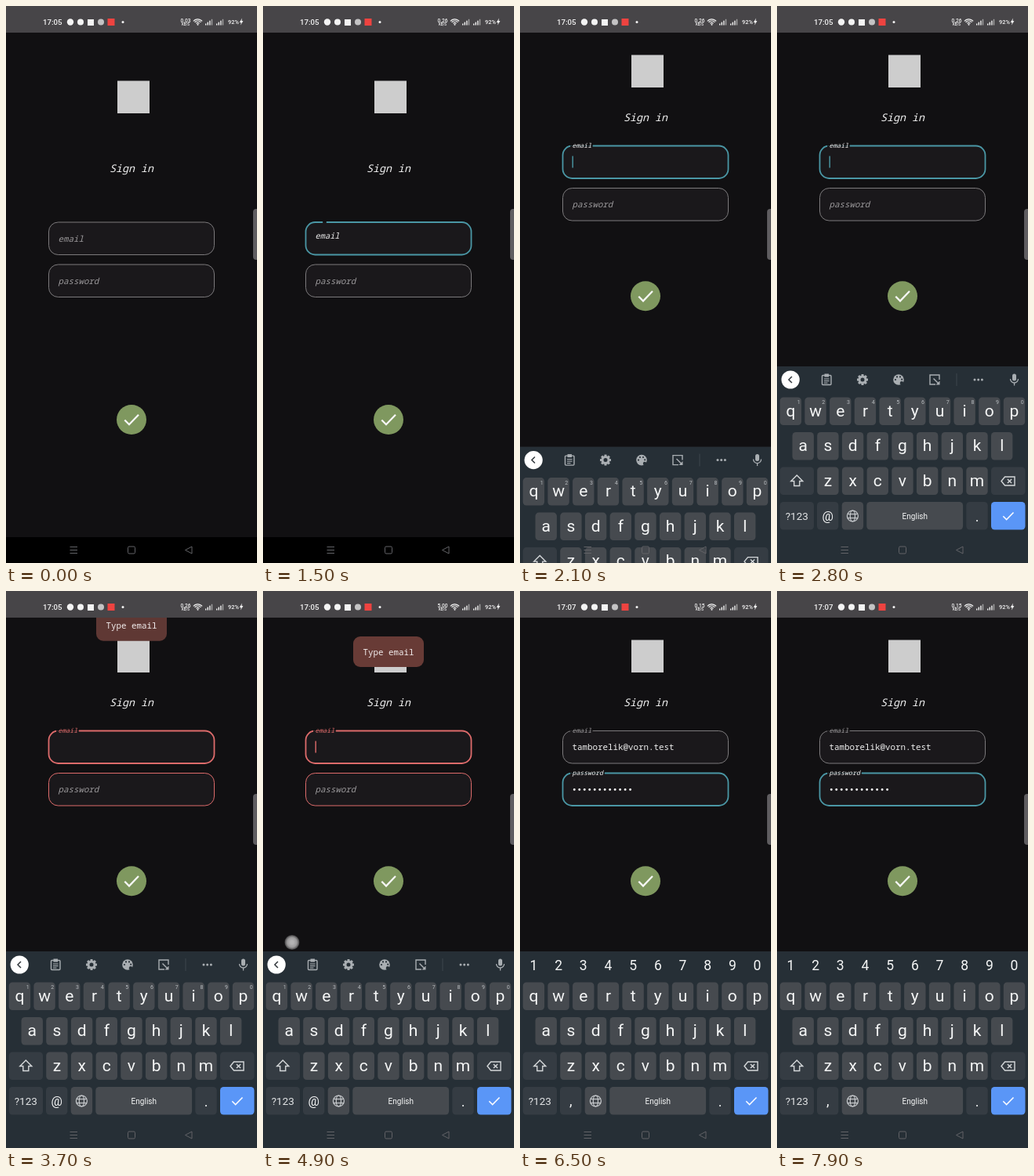
These frames come from a looping animation (320 by 711 pixels, 8 s). An HTML page with a canvas:

```html
<!DOCTYPE html>
<html lang="en">
<head>
<meta charset="utf-8">
<title>Sign in</title>
<style>
html, body { margin: 0; width: 100%; height: 100%; overflow: hidden; background: #111012; }
canvas { display: block; width: 320px; height: 711px; }
</style>
</head>
<body>
<canvas id="stage"></canvas>
<script>
const W = 320, H = 711, LOOP = 8000, CUT = 6500;
const BG = '#111012', FIELD = '#1a181b', KB = '#262f36', KEY = '#464a4f', DARK = '#353c43';
const TEAL = '#4a97a5', RED = '#dd6b6b', GREY = '#7c7a7c', ICON = '#a9aeb2';
const MONO = '"Noto Sans Mono", monospace', SANS = 'Roboto, sans-serif';

const cv = document.getElementById('stage');
const g = cv.getContext('2d');
const dpr = window.devicePixelRatio || 1;
cv.width = W * dpr;
cv.height = H * dpr;

const clamp = v => Math.max(0, Math.min(1, v));
const span = (t, a, b) => clamp((t - a) / (b - a));
const mix = (a, b, p) => a + (b - a) * p;
const easeOut = p => 1 - (1 - p) * (1 - p);
const easeInOut = p => p * p * (3 - 2 * p);

function text(s, x, y, font, color, align = 'left') {
  g.font = font;
  g.fillStyle = color;
  g.textAlign = align;
  g.fillText(s, x, y);
}
function rect(x, y, w, h, color) {
  g.fillStyle = color;
  g.fillRect(x, y, w, h);
}
function box(x, y, w, h, r, fill, stroke, lw = 1) {
  g.beginPath();
  g.roundRect(x, y, w, h, r);
  paint(fill, stroke, lw);
}
function disc(x, y, r, fill, stroke, lw = 1) {
  g.beginPath();
  g.arc(x, y, r, 0, Math.PI * 2);
  paint(fill, stroke, lw);
}
function paint(fill, stroke, lw) {
  if (fill) { g.fillStyle = fill; g.fill(); }
  if (stroke) { g.strokeStyle = stroke; g.lineWidth = lw; g.stroke(); }
}
// Polyline through x,y pairs, relative to an origin
function line(ox, oy, pts, stroke, lw, fill) {
  g.beginPath();
  for (let i = 0; i < pts.length; i += 2) g.lineTo(ox + pts[i], oy + pts[i + 1]);
  if (fill) g.closePath();
  paint(fill, stroke, lw);
}

function statusBar(t) {
  rect(0, 0, W, 34, '#474548');
  text(t < CUT ? '17:05' : '17:07', 47, 23.8, '500 9.7px ' + SANS, '#f4f4f4');
  disc(82, 20.5, 4.2, '#f4f4f4');
  disc(95, 20.5, 4, '#f4f4f4');
  rect(104, 17, 8, 8, '#f4f4f4');
  disc(121, 20.5, 4, '#c4c3c4');
  rect(129.5, 16, 9, 9, '#ee4340');
  disc(149, 20.5, 1.5, '#f4f4f4');
  const rate = t < 700 ? '0.03' : t < 4300 ? '0.26' : t < CUT ? '5.00' : '0.15';
  text(rate, 229, 20.5, '500 6.6px ' + SANS, '#f4f4f4', 'center');
  text('KB/S', 229, 25.3, '500 4.5px ' + SANS, '#f4f4f4', 'center');
  for (const r of [2.5, 5, 7.2]) {
    g.beginPath();
    g.arc(244.5, 24, r, -Math.PI * .78, -Math.PI * .22);
    paint(null, '#f4f4f4', 1.2);
  }
  disc(244.5, 23.8, 1, '#f4f4f4');
  for (const x of [254, 268])
    for (let i = 0; i < 4; i++)
      rect(x + i * 2.6, 22.5 - i * 1.9, 1.4, 2 + i * 1.9, i < 3 ? '#f4f4f4' : '#a6a5a6');
  text('92%', 283, 23, '500 7.4px ' + SANS, '#f4f4f4');
  line(300, 20, [1, -4.5, -2.3, 1, -.3, 1, -1, 4.5, 2.4, -1, .4, -1], null, 0, '#f4f4f4');
}

function navIcons() {
  const c = '#626367';
  for (const y of [690.5, 694.5, 698.5]) rect(81.5, y - .5, 9.5, 1, c);
  box(155.5, 690, 9, 9, 1.5, null, c);
  line(233, 694.5, [-4.5, 0, 4, -4.5, 4, 4.5, -4.5, 0], c, 1);
}

// f: y, label, rise (0 placeholder, 1 floating), gap, border, lw, labelColor
function field(f) {
  box(54.5, f.y, 211, 41.5, 12, FIELD, f.border, f.lw);
  if (f.rise > 0) {
    const w = f.gap * f.rise;
    rect(64 + (f.gap - w) / 2, f.y - 1.5, w, 1.5, BG);
    rect(64 + (f.gap - w) / 2, f.y, w, 1.5, FIELD);
  }
  text(f.label, 66.5, mix(f.y + 24.5, f.y + 2.6, f.rise),
    'italic ' + mix(10.8, 8.2, f.rise) + 'px ' + MONO, f.labelColor);
}

function form(t) {
  const up = easeInOut(span(t, 1600, 1950));
  const rise = easeInOut(span(t, 1450, 1650));
  const focus = t >= 1450, error = t >= 3400 && t < CUT, filled = t >= CUT;

  rect(142, mix(95.5, 62.5, up), 41, 41.5, '#cdcdcd');
  text('Sign in', 160, mix(211.5, 146.5, up), 'italic 13.4px ' + MONO, '#f0f0f0', 'center');

  const y = mix(276, 178.5, up);
  field({
    y, label: 'email', rise, gap: 29,
    border: error ? RED : focus && !filled ? TEAL : GREY,
    lw: focus && !filled ? 1.8 : 1,
    labelColor: error ? RED : focus && !filled ? '#f0f0f0' : '#9b999b'
  });
  field({
    y: y + 54, label: 'password', rise: filled ? 1 : 0, gap: 44,
    border: error ? RED : filled ? TEAL : GREY,
    lw: filled ? 1.8 : 1,
    labelColor: filled ? '#f0f0f0' : '#9b999b'
  });

  if (filled) {
    text('tamborelik@vorn.test', 66.5, y + 24.5, '10.85px ' + MONO, '#f0f0f0');
    for (let i = 0; i < 12; i++) disc(69.3 + i * 6.48, y + 75, 1.45, '#f0f0f0');
    if (t >= 7000 && t < 7500) rect(144.7, y + 66.5, 1.4, 16, TEAL);
  } else if (t >= 1700 && (t + 200) % 1000 < 500) {
    rect(66.5, y + 13, 1.4, 15, error ? RED : TEAL);
  }

  const cy = mix(528, 370.3, up);
  disc(160, cy, 19, '#7f985f');
  line(160, cy, [-8.7, .5, -3, 6.2, 9, -6.3], '#f7f7f7', 2.3);
}

function toast(t) {
  if (t < 3500 || t > 6400) return;
  const p = easeOut(span(t, 3490, 4000)) * (1 - easeInOut(span(t, 6000, 6400)));
  const y = mix(-39, 58, p);
  g.save();
  g.beginPath();
  g.rect(0, 34, W, H);
  g.clip();
  const c = [mix(78, 104, p), mix(50, 59, p), mix(47, 54, p)].map(Math.round);
  box(115, y, 90, 39, 9, `rgb(${c})`);
  text('Type email', 160, y + 23.5, '10.85px ' + MONO, '#f3eeee', 'center');
  g.restore();
}

const cx = i => 17.4 + i * 31.68;

function key(x, y, w, fill) {
  box(x, y, w, 35.5, 4.5, fill);
}
function letters(row, start, y) {
  [...row].forEach((ch, i) => {
    const x = cx(start + i);
    key(x - 13.7, y, 27.4, KEY);
    text(ch, x, y + 24, '21px ' + SANS, '#f5f6f6', 'center');
  });
}

function toolbar() {
  const y = 477;
  disc(17.2, y, 11.6, '#ffffff');
  line(17, y, [2, -4, -2, 0, 2, 4], '#30363b', 1.5);
  // clipboard
  box(57.5, y - 5.5, 11.5, 12, 1, null, ICON, 1.4);
  rect(60.5, y - 7.5, 5.5, 4, ICON);
  for (const d of [-1, 1.5, 4]) rect(60, y + d - .5, d > 3 ? 4.5 : 6.5, 1.1, ICON);
  // gear
  for (let i = 0; i < 8; i++) {
    const a = i * Math.PI / 4, c = Math.cos(a), s = Math.sin(a);
    line(109, y, [c * 4, s * 4, c * 7, s * 7], ICON, 3);
  }
  disc(109, y, 4, null, ICON, 3);
  // palette
  disc(155, y, 6.8, ICON);
  disc(159, y + 4.3, 2.2, KB);
  for (const [dx, dy] of [[-4, 0], [-2, -3.6], [2, -3.6], [4.2, -.3]]) disc(155 + dx, y + dy, 1.1, KB);
  // resize
  line(201, y, [1, 6, -6, 6, -6, -6, 6, -6, 6, 0], ICON, 1.4);
  line(201, y, [-1.5, -1.5, 4.5, 4.5], ICON, 1.4);
  line(201, y, [6.5, 1.5, 6.5, 6.5, 1.5, 6.5], null, 0, ICON);
  rect(228.5, y - 8, 1, 16, '#3d464d');
  for (const d of [-4.7, 0, 4.7]) disc(256.7 + d, y, 1.5, ICON);
  // microphone
  box(300, y - 7.5, 5, 9, 2.5, ICON);
  g.beginPath();
  g.arc(302.5, y - 1, 5, 0, Math.PI);
  paint(null, ICON, 1.3);
  rect(301.9, y + 4, 1.3, 3.5, ICON);
}

function keyboard(t) {
  if (t <= 2000) return;
  g.save();
  g.translate(0, 251 * (1 - easeOut(span(t, 2000, 2280))));
  rect(0, 460, W, 251, KB);
  const digits = '1234567890';
  if (t < CUT) toolbar();
  letters('qwertyuiop', 0, 499.5);
  [...digits].forEach((d, i) => {
    if (t < CUT) text(d, cx(i) + 10.2, 508, '7px ' + SANS, '#b9bdc0', 'center');
    else text(d, cx(i), 484, '17.5px ' + SANS, '#f5f6f6', 'center');
  });
  letters('asdfghjkl', .5, 544);
  letters('zxcvbnm', 1.5, 588.5);

  key(3.7, 588.5, 43.3, DARK);
  line(25.3, 606.5, [0, -7.5, 7.5, 0, 3.5, 0, 3.5, 6, -3.5, 6, -3.5, 0, -7.5, 0], '#d5d8da', 1.4, DARK);
  key(273, 588.5, 43.5, DARK);
  line(295, 606.5, [-9, 0, -4.5, -5.5, 8, -5.5, 8, 5.5, -4.5, 5.5], '#d5d8da', 1.4, DARK);
  line(296.5, 606.5, [-2.6, -2.6, 2.6, 2.6], '#d5d8da', 1.4);
  line(296.5, 606.5, [2.6, -2.6, -2.6, 2.6], '#d5d8da', 1.4);

  const y = 633;
  key(3.7, y, 43.3, DARK);
  text('?123', 25.3, y + 23, '13.5px ' + SANS, '#e3e5e6', 'center');
  key(51, y, 27.4, DARK);
  if (t < CUT) text('@', 64.7, y + 23.5, '16px ' + SANS, '#f5f6f6', 'center');
  else text(',', 64.7, y + 24, '18px ' + SANS, '#f5f6f6', 'center');
  key(82.7, y, 27.4, KEY);
  disc(96.4, y + 18, 7, null, '#c9cccf', 1.2);
  g.beginPath();
  g.ellipse(96.4, y + 18, 3.1, 7, 0, 0, Math.PI * 2);
  paint(null, '#c9cccf', 1.2);
  for (const d of [-2.5, 2.5]) rect(90, y + 17.5 + d, 12.8, 1.1, '#c9cccf');
  key(114.3, y, 122.8, KEY);
  text('English', 175.8, y + 21.5, '10px ' + SANS, '#f5f6f6', 'center');
  key(241.3, y, 27.4, DARK);
  text('.', 255, y + 25, '18px ' + SANS, '#f5f6f6', 'center');
  const pressed = t >= 3200 && t < 3400;
  key(273, y, 43.5, pressed ? '#4b7dcb' : '#5a96f7');
  line(294.8, y + 18, [-6.5, .3, -2.2, 4.5, 6.7, -4.5], '#f7f9ff', 1.6);
  g.restore();
}

function touch(t) {
  const a = Math.min(span(t, 4400, 4550), 1 - span(t, 5450, 5600));
  if (a <= 0) return;
  g.globalAlpha = a;
  const glow = g.createRadialGradient(37, 448.5, 2, 37, 448.5, 9.5);
  glow.addColorStop(0, '#b4b3b4');
  glow.addColorStop(.55, '#9b9a9b');
  glow.addColorStop(.8, '#6c6b6c');
  glow.addColorStop(1, '#3a393b');
  disc(37, 448.5, 9.5, glow);
  g.globalAlpha = 1;
}

function draw(t) {
  g.setTransform(dpr, 0, 0, dpr, 0, 0);
  rect(0, 0, W, H, BG);
  form(t);
  toast(t);
  statusBar(t);
  rect(0, 678, W, 33, '#000');
  keyboard(t);
  navIcons();
  box(315, 259, 8, 65, 4, '#5f5d60');
  touch(t);
}

const start = performance.now();
function tick() {
  draw((performance.now() - start) % LOOP);
  requestAnimationFrame(tick);
}
tick();
</script>
</body>
</html>
```
